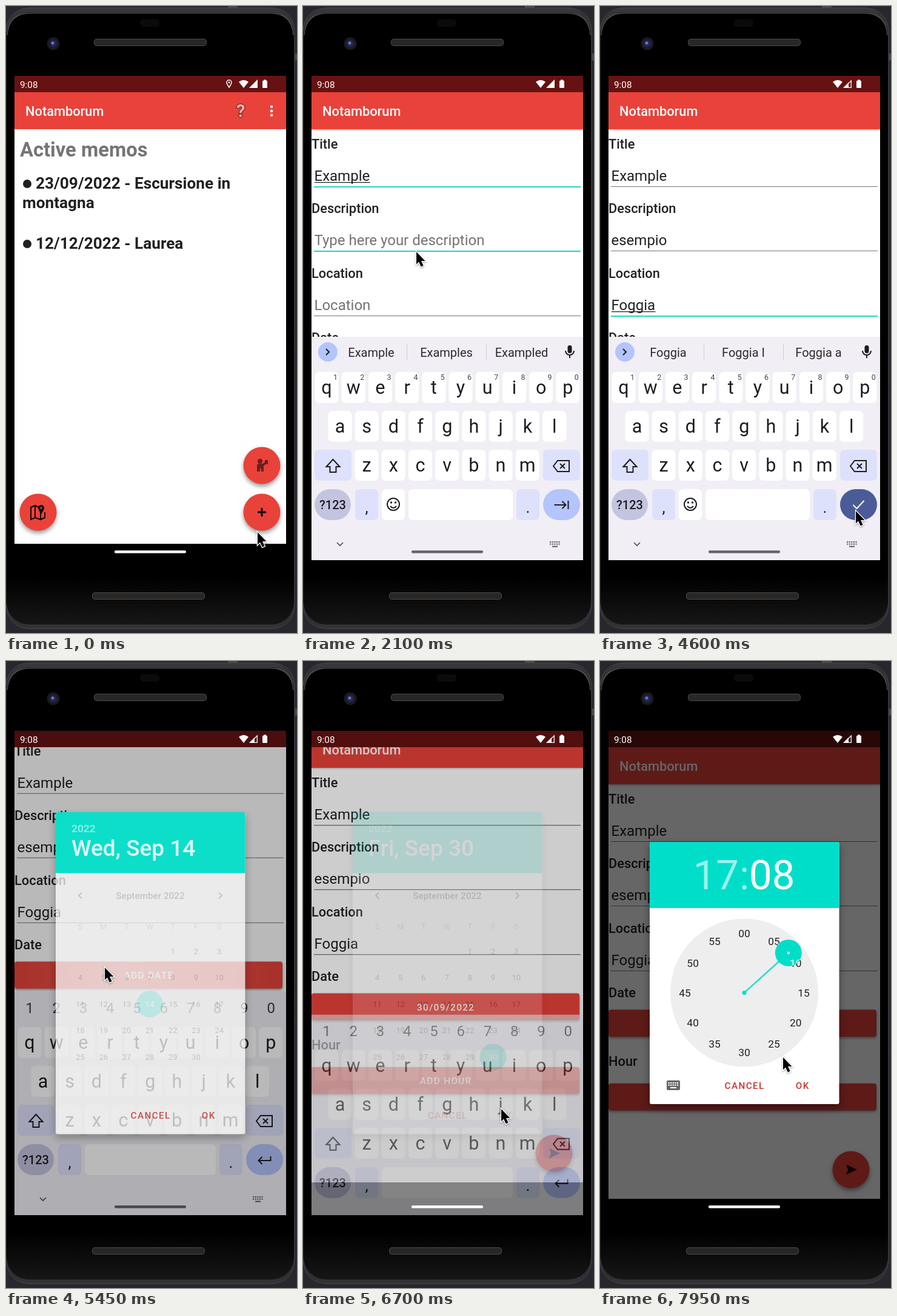
Recreate the animation shown at these times as an HTML page with a canvas. Size 480x1033 px, loop 8 s.

```html
<!DOCTYPE html>
<html lang="en">
<head>
<meta charset="utf-8">
<title>Memo app demo</title>
<style>
  html, body { margin: 0; width: 100%; height: 100%; overflow: hidden; background: #2b2c33; }
  canvas { display: block; }
</style>
</head>
<body>
<canvas id="stage" width="480" height="1033"></canvas>
<script>
let ctx = document.getElementById('stage').getContext('2d');
const LOOP = 8000, RED = '#e9423a', TEAL = '#00dec9', INK = '#212121', KEY_BLUE = '#b4c4fc';
const APP_NAME = 'Notamborum';

// Each key is [time, ...values]; values are interpolated between neighbours.
function track(t, keys, ease = u => u) {
  const i = keys.findIndex(k => k[0] > t);
  if (i === 0) return keys[0].slice(1);
  if (i < 0) return keys[keys.length - 1].slice(1);
  const a = keys[i - 1], b = keys[i], u = ease((t - a[0]) / (b[0] - a[0]));
  return a.slice(1).map((v, n) => v + (b[n + 1] - v) * u);
}
const smooth = u => u * u * (3 - 2 * u);

const CURSOR = [
  [50, 414, 866], [250, 420, 836], [450, 420, 836], [950, 180, 282], [1800, 180, 282],
  [2050, 186, 404], [2750, 186, 404], [3050, 190, 495], [4250, 190, 495], [4500, 421, 831],
  [4650, 421, 831], [5100, 162, 504], [5500, 162, 504], [5850, 310, 650], [6200, 310, 650],
  [6500, 326, 737], [6750, 326, 737], [7000, 328, 711], [7220, 328, 711], [7480, 266, 596],
  [7700, 266, 596], [7950, 301, 652], [8000, 315, 676]];
const FORM = [[400, 0], [550, 1]];
const KEYBOARD = [[1080, 0], [1250, 1], [6699, 1], [6700, .65], [6800, 0]];
const SCROLL = [[4650, 0], [4750, -79.3], [6699, -79.3], [6700, -27.5], [6750, 0]];
const DIM = [[5400, 0], [5450, .27], [5510, .6], [6699, .6], [6700, .2], [6750, 0],
             [7110, 0], [7200, .46], [7230, .6]];
const DATE_OPEN = [[5400, 0], [5450, .72], [5500, 1]];
const DATE_CONTENT = [[5410, 0], [5450, .25], [5520, 1]];
const DATE_CLOSE = [[6699, 1], [6700, .15], [6750, 0]];
const TIME_OPEN = [[7110, 0], [7200, .97], [7230, 1]];

const FIELDS = [
  { label: 'Title', hint: 'Type here your title', word: 'Example', y: 235, focus: 1050, blur: 2150, start: 1650, step: 55, more: ['s', 'd'] },
  { label: 'Description', hint: 'Type here your description', word: 'esempio', y: 341, focus: 2090, blur: 3150, start: 2250, step: 70, more: [' di', ' e'] },
  { label: 'Location', hint: 'Location', word: 'Foggia', y: 448, focus: 3150, blur: 4700, start: 3750, step: 60, more: [' I', ' a'] }];
const typed = (f, t) => t < f.start ? '' : f.word.slice(0, 1 + Math.floor((t - f.start) / f.step));

// Draws a group in a buffer, so that overlapping parts fade as one picture.
const buffers = [];
let depth = 0;
function layer(alpha, draw) {
  if (alpha <= 0) return;
  const outer = ctx, fading = alpha < 1;
  if (fading) {
    ctx = buffers[depth] ??= new OffscreenCanvas(480, 1033).getContext('2d');
    ctx.clearRect(0, 0, 480, 1033);
    depth++;
  }
  ctx.save();
  draw();
  ctx.restore();
  if (!fading) return;
  depth--;
  outer.globalAlpha = alpha;
  outer.drawImage(ctx.canvas, 0, 0);
  outer.globalAlpha = 1;
  ctx = outer;
}
function clipTo(x, y, w, h, draw) {
  ctx.save();
  ctx.beginPath(); ctx.rect(x, y, w, h); ctx.clip();
  draw();
  ctx.restore();
}
function raised(blur, dy, draw) {
  ctx.save();
  ctx.shadowColor = 'rgba(0,0,0,.4)'; ctx.shadowBlur = blur; ctx.shadowOffsetY = dy;
  draw();
  ctx.restore();
}
function box(x, y, w, h, color, r = 0) {
  ctx.fillStyle = color;
  ctx.beginPath(); ctx.roundRect(x, y, w, h, r); ctx.fill();
}
function disc(x, y, r, color) {
  ctx.fillStyle = color;
  ctx.beginPath(); ctx.arc(x, y, r, 0, 7); ctx.fill();
}
function fillPath(d, color, x = 0, y = 0) {
  ctx.save();
  ctx.translate(x, y); ctx.fillStyle = color; ctx.fill(new Path2D(d));
  ctx.restore();
}
function strokePath(d, color, width, x = 0, y = 0) {
  ctx.save();
  ctx.translate(x, y); ctx.strokeStyle = color; ctx.lineWidth = width; ctx.stroke(new Path2D(d));
  ctx.restore();
}
function text(s, x, y, size, color = INK, { weight = 400, align = 'left', spacing = 0 } = {}) {
  ctx.font = `${weight} ${size}px Roboto, sans-serif`;
  ctx.textAlign = align; ctx.letterSpacing = spacing + 'px'; ctx.fillStyle = color;
  ctx.fillText(s, x + (align === 'center' ? spacing / 2 : 0), y);
}
const centered = (s, x, y, size, color, weight) => text(s, x, y, size, color, { weight, align: 'center' });
const caps = (s, x, y, color) => text(s, x, y, 15.3, color, { weight: 500, align: 'center', spacing: 1.36 });

function drawPhone() {
  box(0, 0, 480, 1033, '#27282e');
  box(474, 78, 6, 12, '#4a4c4f', 2);
  box(366, 0, 16, 4, '#4a4c4f');
  const rim = ctx.createLinearGradient(0, 0, 0, 1033);
  rim.addColorStop(0, '#3a3a3b'); rim.addColorStop(.06, '#252526');
  rim.addColorStop(.94, '#222223'); rim.addColorStop(1, '#363637');
  box(-1, 3, 478, 1023, rim, 42);
  strokePath('M0 42Q3 3 42 3H434Q474 3 476 42V985Q474 1026 434 1026H42Q3 1026 0 985', '#48484a', 1);
  const glass = ctx.createLinearGradient(0, 940, 0, 1018);
  glass.addColorStop(0, '#000'); glass.addColorStop(1, '#161616');
  box(1, 11, 474, 1008, glass, 37);
  strokePath('M2 48Q4 12 40 12H436Q472 12 474 48', '#606061', 1.2);
  box(221, 22, 32, 12, '#0b0b0d', 5);
  disc(78, 62, 10.5, '#1b1b1e');
  disc(78, 62, 6, '#20245a');
  disc(77, 61, 2.5, '#6b75bb');
  for (const [x, y] of [[145, 54], [142, 966]]) {
    box(x, y, 186, 12, '#4d4b49', 5);
    box(x + 1, y + 1, 184, 10, '#292725', 4);
  }
}

function fab(x, y) {
  raised(7, 4, () => disc(x, y, 30.5, RED));
}

function drawHome() {
  box(14, 142, 448, 744, '#fff');
  box(14, 142, 448, 61, RED);
  text(APP_NAME, 32, 181, 21.8, '#fff', { weight: 500 });
  ctx.lineWidth = 2.5; ctx.strokeStyle = '#7b2623';
  text('?', 380, 183, 29, '#f4b3ae', { weight: 700 });
  ctx.strokeText('?', 380, 183);
  text('?', 380, 183, 29, '#f4b3ae', { weight: 700 });
  for (const y of [166, 173, 180]) disc(438, y, 2.3, '#fff');
  text('Active memos', 23, 248, 32.7, '#757575', { weight: 700 });
  const bold = { weight: 700 };
  disc(35, 293, 7, INK);
  text('23/09/2022 - Escursione in', 49, 301, 26.2, INK, bold);
  text('montagna', 27, 333, 26.2, INK, bold);
  disc(35, 392, 7, INK);
  text('12/12/2022 - Laurea', 49, 400, 26.2, INK, bold);
  fab(422, 757); fab(53, 834); fab(422, 834);
  disc(419, 750, 4, '#6e1e1a');
  fillPath('M-8 10V0Q-8-3-4-3H2L5-6V-9H10V-2H6L3 1V10H-1V5H-3V10Z', '#6e1e1a', 422, 757);
  strokePath('M-12-8L-5-11V9L-12 12ZM-5-11L1-8M-5 9L4 12V0M4 12L11 9V0', '#120505', 2, 53, 834);
  fillPath('M5 3Q0-4 0-7A5 5 0 0 1 10-7Q10-4 5 3Z', '#120505', 53, 834);
  disc(58, 827, 1.7, RED);
  strokePath('M-7 0H7M0-7V7', '#120505', 3, 422, 834);
}

function wideButton(label, y, rippling) {
  raised(4, 2, () => box(14, y, 442, 44.5, RED, 4));
  if (rippling) {
    const ripple = ctx.createLinearGradient(14, 0, 456, 0);
    ripple.addColorStop(0, 'rgba(255,255,255,0)');
    ripple.addColorStop(.4, 'rgba(255,255,255,.14)');
    ripple.addColorStop(1, 'rgba(255,255,255,0)');
    box(14, y, 442, 44.5, ripple, 4);
  }
  caps(label, 235, y + 28, '#fff');
}

function drawForm(t) {
  const scroll = track(t, SCROLL)[0];
  box(14, 142, 448, 744 + scroll, '#fff');
  ctx.translate(0, scroll);
  raised(3, 1, () => box(14, 142, 448, 61, RED));
  text(APP_NAME, 32, 181, 21.8, '#fff', { weight: 500 });
  for (const f of FIELDS) {
    const value = typed(f, t), focused = t >= f.focus && t < f.blur;
    const blinkOn = Math.floor((t - f.focus - 50) / 250) % 2 === 0;
    text(f.label, 14, f.y, 21.8, INK, { weight: 500 });
    text(value || f.hint, 18.5, f.y + 53, 24, value ? INK : '#737373');
    const width = value ? ctx.measureText(value).width : 0;
    if (focused && value) box(19, f.y + 55, width, 1.3, INK);
    if (blinkOn && t >= f.focus + 60 && t < f.blur - 60) box(19 + width, f.y + 29, 2, 30, TEAL);
    box(18, f.y + 62, 440, focused ? 2 : 1.1, focused ? '#20d6c0' : '#757575');
  }
  text('Date', 14, 554, 21.8, INK, { weight: 500 });
  wideButton(t < 6600 ? 'ADD DATE' : '30/09/2022', 574.5, t > 5300 && t < 5520);
  text('Hour', 14, 667, 21.8, INK, { weight: 500 });
  wideButton('ADD HOUR', 696, t > 7060 && t < 7250);
  fab(414, 838);
  fillPath('M-8-8.5L10 0L-8 8.5L-5 0Z', '#240807', 414, 838);
}

function key(x, y, w, color = '#fff', r = 7) { box(x, y, w, 51, color, r); }

function drawKeyboard(t) {
  const numbers = t >= 4700, dark = '#1d1c21';
  box(14, 545, 448, 368, '#f1eff5');
  if (numbers) {
    [...'1234567890'].forEach((c, i) => centered(c, 39 + 44.25 * i, 580, 24, '#3c3b40'));
  } else {
    disc(41, 570, 16, KEY_BLUE);
    strokePath('M-3-5L2 0L-3 5', dark, 2, 41, 570);
    box(171, 557, 1, 26, '#d0ced5'); box(302, 557, 1, 26, '#d0ced5');
    const field = FIELDS.find(f => t >= f.focus && t < f.blur);
    const word = field && typed(field, t);
    if (word) ['', ...field.more].forEach((m, i) => centered(word + m, 112.5 + 124 * i, 578, 20, '#2b2a2f'));
    box(436.5, 559, 7, 13, dark, 3.5);
    strokePath('M-7-2A7 7 0 0 0 7-2M0 5V10', dark, 2, 440, 570);
  }
  ['qwertyuiop', 'asdfghjkl', 'zxcvbnm'].forEach((row, r) => [...row].forEach((c, i) => {
    const x = [39, 61, 105][r] + 44.2 * i, y = 603 + 64 * r;
    key(x - 19.5, y, 39);
    centered(c, x, y + 36, 30.5, dark);
    if (!r && !numbers) centered((i + 1) % 10, x + 14.5, y + 13, 12.5, '#454449');
  }));
  key(19, 731, 61, '#dde1fb');
  strokePath('M0-11L-11 1H-5V10H5V1H11Z', dark, 2, 49.5, 758);
  key(396, 731, 61, '#dde1fb');
  strokePath('M-13 0L-6-9H13V9H-6ZM-2-4L6 4M6-4L-2 4', dark, 2, 426, 758);
  key(19, 796, 60, '#c3c4e0', 26);
  centered('?123', 49, 829, 20, dark, 500);
  key(86, 796, 38, '#dde1fb'); centered(',', 105, 835, 26, dark);
  if (numbers) key(130, 796, 216);
  else {
    key(130, 796, 38); key(174, 796, 172);
    strokePath('M10 0A10 10 0 1 1-10 0A10 10 0 1 1 10 0M-5 3Q0 9 5 3', dark, 2, 149, 821);
    disc(145.5, 818, 1.7, dark); disc(152.5, 818, 1.7, dark);
  }
  key(352, 796, 38, '#dde1fb'); centered('.', 371, 835, 26, dark);

  const pressed = t >= 4540 && t < 4670;
  key(396, 796, 61, pressed ? '#4a5b98' : KEY_BLUE, 26);
  const enter = numbers ? 'M10-6V1H-9M-4-5L-10 1L-4 7'
    : t >= 3150 ? 'M-9 0L-3 6L9-7' : 'M-12 0H6M1-6L7 0L1 6M11-7V7';
  strokePath(enter, pressed ? '#fff' : dark, 2, 426.5, 822);

  strokePath('M-5-2L0 3L5-2', '#4a494e', 1.6, 61, 886);
  for (let i = 0; i < 10; i++) box(407 + (i % 5) * 3.6, 882 + Math.floor(i / 5) * 3.5, 2.2, 2, '#5b5a60');
  box(411, 889.5, 9, 2, '#5b5a60');
  box(179, 897, 118, 4.5, '#67656b', 2);
}

function drawStatus(t) {
  text('9:08', 23, 134.5, 15.3, '#fff');
  if (t < 500) {
    strokePath('M0 6Q-4 0-4-2A4 4 0 0 1 4-2Q4 0 0 6Z', '#fff', 1.5, 368, 128);
    disc(368, 126, 1.4, '#fff');
  }
  fillPath('M0 7L-8-3Q0-9 8-3Z', '#fff', 392, 128);
  if (t < 2900) fillPath('M401 135H415V121Z', '#fff');
  else {
    strokePath('M403 134.3H414.3V123Z', '#fff', 1.3);
    fillPath('M401 135H410V126Z', '#fff');
  }
  box(423, 123, 8, 12, '#fff', 1); box(425, 121.5, 4, 2, '#fff');
}

function dialog(alpha, y, headHeight, height) {
  layer(alpha, () => raised(14, 6, () => box(82, y, 312.5, height, '#fff', 3)));
  layer(alpha * 1.3, () => box(82, y, 312.5, headHeight, TEAL, [3, 3, 0, 0]));
}
function dialogButtons(y) {
  caps('CANCEL', 238, y, '#c8372f');
  caps('OK', 333.5, y, '#c8372f');
}

function drawDateDialog(t) {
  const alpha = track(t, DATE_OPEN)[0], day = t < 6000 ? 14 : 30;
  dialog(alpha, 249, 100.5, 530.5);
  layer(alpha * 1.2, () => {
    text('2022', 108, 282, 17.4, 'rgba(255,255,255,.7)', { weight: 500 });
    text(day === 14 ? 'Wed, Sep 14' : 'Fri, Sep 30', 108, 321, 37, '#fff', { weight: 500 });
    dialogButtons(754);
  });
  layer(alpha * track(t, DATE_CONTENT)[0], () => {
    centered('September 2022', 238, 391.5, 15.3, INK, 500);
    strokePath('M3-5L-2 0L3 5', INK, 1.8, 122, 386.5);
    strokePath('M-3-5L2 0L-3 5', INK, 1.8, 354, 386.5);
    [...'SMTWTFS'].forEach((c, i) => centered(c, 122.5 + 38.2 * i, 441.5, 13, '#8a8a8a'));
    for (let d = 1; d <= 30; d++) {
      const slot = d + 3, x = 122.5 + 38.2 * (slot % 7), y = 478 + 43.6 * Math.floor(slot / 7);
      if (d === day) disc(x, y, 22, TEAL);
      centered(d, x, y + 4.5, 13, d === day ? '#fff' : INK);
    }
  });
}

function clockNumbers(minutes, color) {
  for (let i = 0; i < 12; i++) {
    const a = i * Math.PI / 6, dx = Math.sin(a), dy = -Math.cos(a);
    const outer = minutes ? String(i * 5).padStart(2, '0') : i || 12;
    centered(outer, 238 + 98 * dx, 552.5 + 98 * dy, 17.4, color || INK);
    if (!minutes) centered(i ? i + 12 : '00', 238 + 59 * dx, 551.5 + 59 * dy, 14.2, color || '#757575');
  }
}

function drawTimeDialog(t) {
  const alpha = track(t, TIME_OPEN)[0], minutes = t >= 7650, hour = t < 7530 ? 21 : 17;
  dialog(alpha, 298, 109, 432);
  layer(alpha, () => {
    const soft = 'rgba(255,255,255,.6)';
    text(hour, 229, 376, 67, minutes ? soft : '#fff', { align: 'right' });
    centered(':', 238, 376, 67, soft);
    text('08', 246, 376, 67, minutes ? '#fff' : soft);
    disc(238, 546.5, 122, '#eee');
    clockNumbers(minutes);
    const a = (minutes ? 48 : hour * 30) * Math.PI / 180, reach = minutes ? 98 : 59;
    const x = 238 + reach * Math.sin(a), y = 546.5 - reach * Math.cos(a);
    strokePath(`M238 546.5L${x} ${y}`, TEAL, 2.2);
    disc(238, 546.5, 3.5, TEAL);
    disc(x, y, 22, TEAL);
    ctx.save();
    ctx.beginPath(); ctx.arc(x, y, 22, 0, 7); ctx.clip();
    clockNumbers(minutes, '#fff');
    ctx.restore();
    if (minutes) disc(x, y, 2.2, '#fff');
    box(110, 691, 22, 16, '#666', 2);
    for (let i = 0; i < 10; i++) box(112.5 + (i % 5) * 3.6, 694 + Math.floor(i / 5) * 3.6, 2.2, 2.2, '#fff');
    box(116, 702, 10, 2, '#fff');
    dialogButtons(705);
  });
}

function drawCursor(t) {
  const [x, y] = track(t, CURSOR, smooth);
  const arrow = 'M1 1V21.5L5 17.5L8.8 25.5L12.6 23.8L9 16H15.5Z';
  raised(3, 1, () => strokePath(arrow, '#fff', 2.6, x, y));
  fillPath(arrow, '#000', x, y);
}

function draw(t) {
  const form = track(t, FORM)[0], kb = track(t, KEYBOARD)[0];
  drawPhone();
  box(14, 115, 448, 798, '#000');
  box(14, 115, 448, 27, '#671212');
  clipTo(14, 142, 448, 771, () => {
    if (form < 1) drawHome();
    layer(form, () => {
      ctx.translate(0, 30 * (1 - form));
      drawForm(t);
    });
    layer(kb, () => {
      ctx.translate(0, 106 * (1 - kb));
      drawKeyboard(t);
    });
  });
  box(14, 115, 448, 798, `rgba(0,0,0,${track(t, DIM)[0]})`);
  drawStatus(t);
  if (kb < .9) box(179, 897, 118, 4.5, '#fff', 2);
  layer(track(t, DATE_CLOSE)[0], () => drawDateDialog(t));
  drawTimeDialog(t);
  drawCursor(t);
}

const began = performance.now();
(function tick() {
  draw((performance.now() - began) % LOOP);
  requestAnimationFrame(tick);
})();
</script>
</body>
</html>
```
